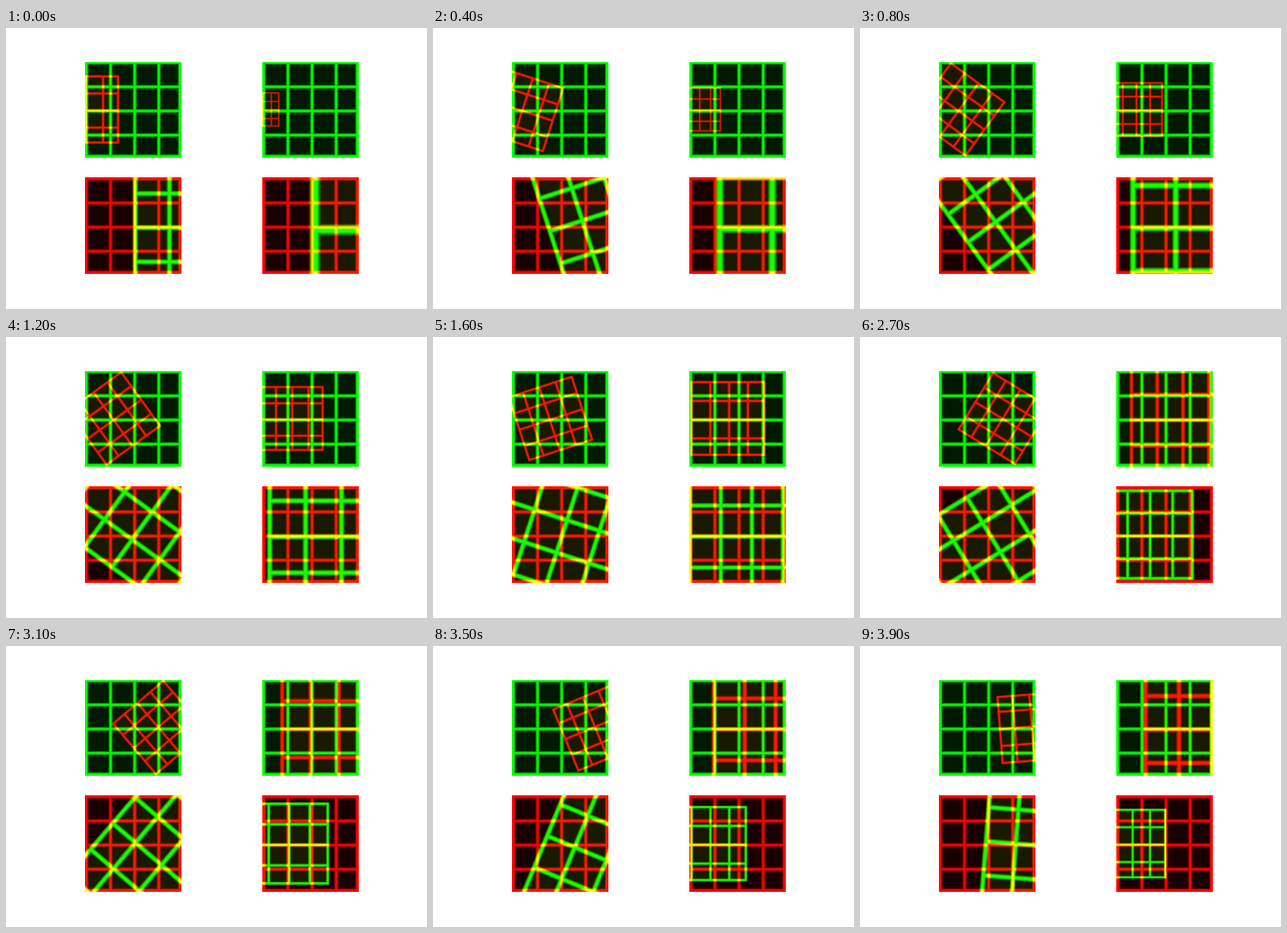
Write a matplotlib script that moves like this. It is 432 px wide and 288 px high and loops after 4 s.

```python
import numpy as np
import matplotlib.pyplot as plt
from matplotlib.animation import FuncAnimation

FRAMES = 40
SIZE = 64                              # lattice units per panel side
SAMPLES = 128                          # samples per panel side
LINES = np.array([1, 17, 33, 49, 63])  # line centres
FLOOR = 0.1                            # brightness between the lines
BASE_SCALE = np.sqrt(0.5)

axis = (np.arange(SAMPLES) + 0.5) * SIZE / SAMPLES
X, Y = np.meshgrid(axis, axis)
HALF = SIZE / 2


def line(u):
    """Soft-edged line profile along one coordinate."""
    u = np.clip(u, 0.5, SIZE - 0.5)
    dist = np.abs(u[..., None] - LINES).min(axis=-1)
    return np.clip(1.5 - dist, 0, 1)


def inside(u):
    """1 within the lattice, fading to 0 just past its border."""
    return np.clip(np.minimum(u, SIZE - u) + 0.5, 0, 1)


def lattice(x, y):
    lines = np.maximum(line(x), line(y))
    return (FLOOR + (1 - FLOOR) * lines) * inside(x) * inside(y)


def placed(angle, scale, shift):
    """Lattice turned, scaled, then moved sideways by shift half-widths."""
    c, s = np.cos(angle), np.sin(angle)
    x, y = X - HALF - shift * HALF, Y - HALF
    return lattice((c * x + s * y) / scale + HALF,
                   (c * y - s * x) / scale + HALF)


def placed_inverse(angle, scale, shift):
    """Lattice under the inverse of the same transform."""
    c, s = np.cos(angle), np.sin(angle)
    x, y = X - HALF, Y - HALF
    return lattice((c * x - s * y) * scale + shift * HALF + HALF,
                   (s * x + c * y) * scale + HALF)


def overlay(red, green):
    return np.dstack([red, green, np.zeros_like(red)])


FIXED = lattice(np.clip(X, 0.5, SIZE - 0.5), np.clip(Y, 0.5, SIZE - 0.5))

fig, axes = plt.subplots(2, 2, figsize=(6, 4), dpi=72, facecolor="white")
fig.subplots_adjust(left=0.125, right=0.9, bottom=0.125, top=0.88,
                    wspace=0.2, hspace=0.2)
images = []
for ax in axes.flat:
    ax.axis("off")
    images.append(ax.imshow(overlay(FIXED, FIXED)))


def update(frame):
    t = frame / FRAMES
    shift = 2 * t - 1
    turning = (np.pi * t, BASE_SCALE, shift)
    growing = (0, BASE_SCALE * (0.5 + 1.5 * t), shift)
    for col, motion in enumerate((turning, growing)):
        images[col].set_data(overlay(placed(*motion), FIXED))
        images[col + 2].set_data(overlay(FIXED, placed_inverse(*motion)))
    return images


anim = FuncAnimation(fig, update, frames=FRAMES, interval=100,
                     repeat=True, repeat_delay=0)
plt.show()
```
